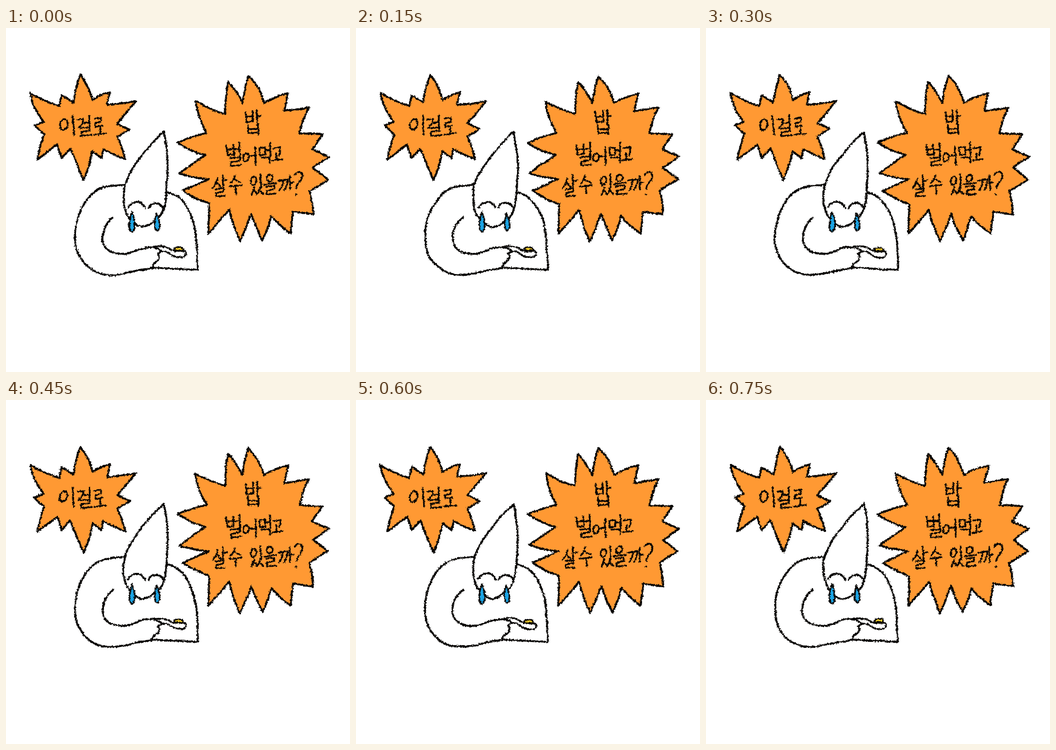
Recreate the animation shown at these times as an HTML page. Size 748 by 748 pixels, loop 0.87 s.

```html
<!DOCTYPE html>
<html lang="ko">
<head>
<meta charset="utf-8">
<style>
  html, body { margin: 0; height: 100%; overflow: hidden; background: #fff; }
  svg { display: block; width: 100vw; height: 100vh; }
  .ink { fill: none; stroke: #080604; stroke-width: 4.2; stroke-linecap: round; stroke-linejoin: round; }
  .letters { stroke-width: 3.7; }
  .bubble { fill: #ff9933; }
  .tear { fill: #1ba3e3; stroke-width: 3.4; }
  .rice { fill: #ffd52e; stroke-width: 3.2; }
</style>
</head>
<body>
<svg viewBox="0 0 748 748" role="img">
  <title>이걸로 밥 벌어먹고 살 수 있을까?</title>
  <defs>
    <!-- A slow drift plus a fine grain make the crayon line. -->
    <filter id="crayon" filterUnits="userSpaceOnUse" x="0" y="0" width="748" height="748" color-interpolation-filters="sRGB">
      <feTurbulence class="noise" type="fractalNoise" baseFrequency=".025" numOctaves="1" result="drift"/>
      <feTurbulence class="noise" type="fractalNoise" baseFrequency=".3" numOctaves="2" result="grain"/>
      <feDisplacementMap in="SourceGraphic" in2="drift" scale="4" xChannelSelector="R" yChannelSelector="G" result="drifted"/>
      <feDisplacementMap in="drifted" in2="grain" scale="6" xChannelSelector="R" yChannelSelector="G"/>
    </filter>
    <path id="small" d="M161 102Q181 124 188 157Q205 145 226 140L219 167Q252 165 283 159L242 207L269 220L242 236Q253 259 259 285Q232 275 211 263L208 283L188 268Q183 300 168 331L140 262L121 283L112 254L68 286Q73 260 83 231L62 212L82 204Q59 175 53 141Q88 162 116 169L121 146L147 162Q151 130 161 102Z"/>
    <path id="large" d="M527 105Q550 125 561 163Q586 148 614 142L605 181Q632 177 658 172Q644 199 638 229L688 231L666 264L702 280L668 304L700 329L660 354Q668 380 668 406L624 399L619 447Q596 432 577 409Q569 437 558 462Q545 436 533 404Q522 437 508 464Q495 432 485 395Q463 423 440 447L442 382Q411 372 384 354L440 329Q407 326 377 316Q402 297 434 276Q403 269 373 249Q405 235 437 228Q417 194 412 159Q444 178 476 187Q477 151 483 117Q499 134 514 163Q517 133 527 105Z"/>
  </defs>

  <use href="#small" class="bubble"/>
  <use href="#large" class="bubble"/>

  <g class="ink" filter="url(#crayon)">
    <use href="#small"/>
    <use href="#large"/>

    <!-- body and arm -->
    <path d="M257 341C236 343 222 343 210 347C175 360 148 410 150 460C152 505 185 533 215 536C240 539 270 531 290 526Q305 525 318 521L417 526C416 470 413 430 401 405C390 378 372 362 350 357"/>
    <path d="M232 412C215 425 208 445 210 463C214 488 240 492 262 491C282 487 295 475 318 477Q334 478 339 486L330 491Q337 495 331 505L321 513L317 523"/>
    <!-- head -->
    <path d="M268 414C258 399 253 377 256 350C262 313 310 255 343 226C352 262 353 302 350 340C349 375 345 400 333 412"/>
    <path d="M281 426Q292 434 300 432Q315 428 322 420M266 390C272 378 292 370 303 391M310 391C316 378 335 375 344 393"/>
    <path class="tear" d="M274 400Q282 421 279 437Q274 449 269 437Q266 421 274 400Z"/>
    <path class="tear" d="M327 403Q336 421 334 434Q329 447 324 435Q322 419 327 403Z"/>
    <!-- spoon -->
    <path class="rice" d="M365 483Q367 476 375 477Q384 475 386 484Z"/>
    <path stroke-width="3.6" d="M318 476Q341 472 354 479Q360 484 367 485L390 485Q395 496 384 498Q368 500 357 491Q350 484 338 486"/>

    <g class="letters">
      <!-- 이걸로 -->
      <path d="M127 198C115 201 114 220 122 222C133 222 140 201 127 198M145 190L147 232"/>
      <path d="M155 199L168 198Q167 210 157 218M170 207L180 206M181 190V214M161 219L181 217V224L163 227V235L186 233"/>
      <path d="M193 197L207 195L206 204L194 207V215L209 212M205 214V229M192 232L218 229"/>
      <!-- 밥 -->
      <path d="M521 182L523 205L538 203M537 180L538 203M522 193L537 192M546 178L547 210M547 192L554 191M526 211L527 229L549 227M549 209V231M527 220L548 219"/>
      <!-- 벌어먹고 -->
      <path d="M479 255L482 276L496 274M494 253L496 275M480 265L495 263M497 264L507 263M508 249L509 278M488 282L509 280V287L490 291V299L512 297"/>
      <path d="M523 272C514 274 514 288 519 290C529 291 532 274 523 272M531 279L541 278M542 259L543 298"/>
      <path d="M551 261L552 277L564 275L563 260ZM565 266L573 265M574 250L575 279M555 282L574 281V293"/>
      <path d="M581 262L597 260Q597 268 594 277M588 272V286M579 288L601 285"/>
      <!-- 살 수 -->
      <path d="M459 327Q457 340 449 348M458 336L467 346M471 319L472 347M472 333L481 331M456 351L473 349V355L457 359V366L476 365"/>
      <path d="M499 321Q497 331 489 338M499 330L510 336M487 345L513 342M500 344L501 361"/>
      <!-- 있을까? -->
      <path d="M539 323C530 325 531 340 536 341C545 340 548 325 539 323M553 318L554 346M540 346L534 362M540 353L546 360M552 347Q550 356 546 361M552 354L560 361"/>
      <path d="M574 319C564 320 565 333 571 334C582 333 583 320 574 319M561 340L587 337M565 345L583 343V350L567 354V362L587 360"/>
      <path d="M592 332L602 330Q601 345 594 353M604 330L612 329Q611 343 605 352M616 321L617 352M617 337L624 336"/>
      <path d="M627 319Q632 311 641 314Q648 320 641 332Q632 341 631 350M630 362l1 1"/>
    </g>
  </g>
</svg>
<script>
  const LOOP = 870, STEP = 150;
  const noises = document.querySelectorAll('.noise');
  let shown = -1;

  function draw(now) {
    const pose = Math.floor(now % LOOP / STEP);
    if (pose !== shown) {
      noises.forEach((noise, i) => noise.setAttribute('seed', 3 + pose * 7 + i));
      shown = pose;
    }
    requestAnimationFrame(draw);
  }
  draw(performance.now());
</script>
</body>
</html>
```
